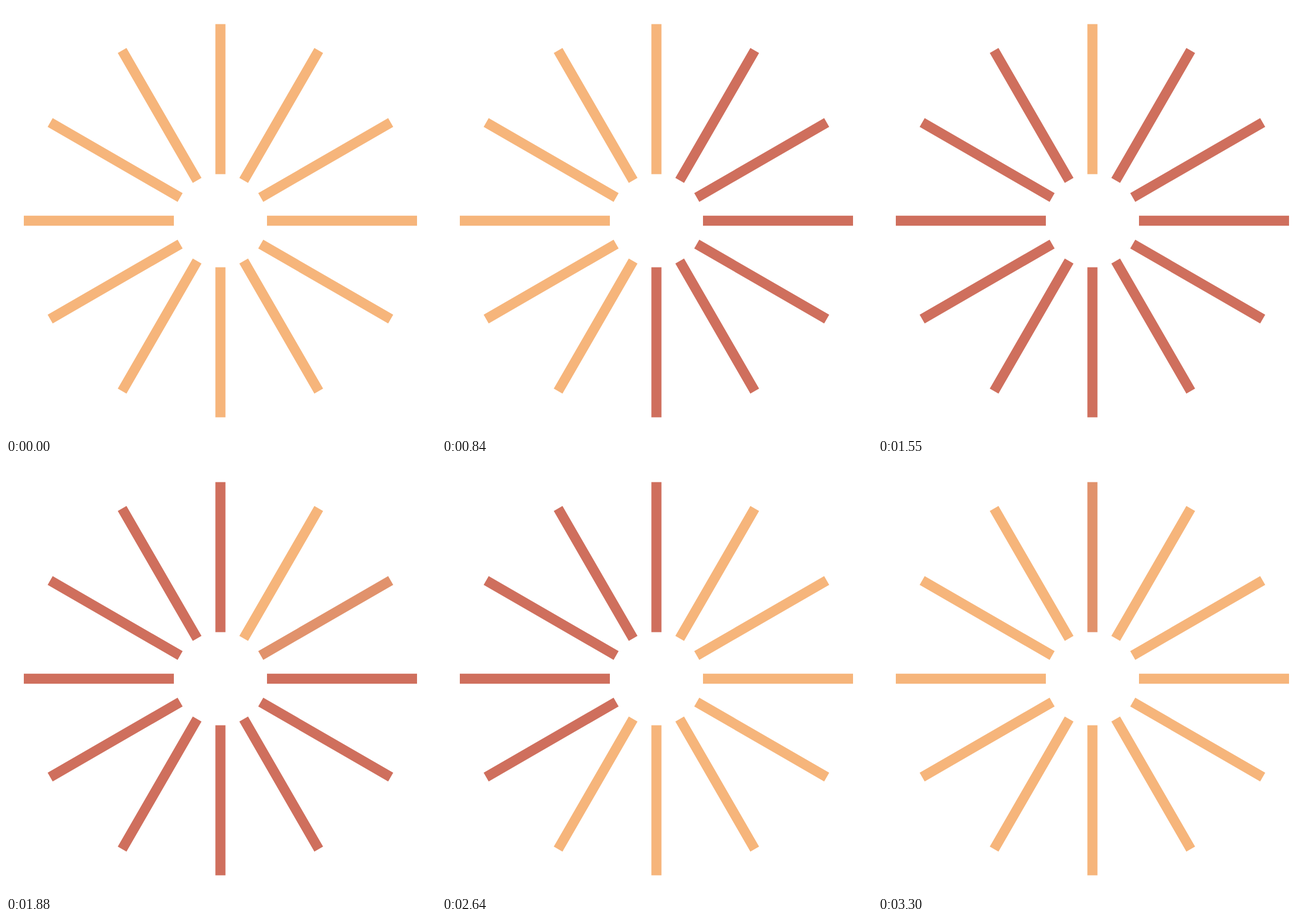
Write an HTML page that moves like this. It is 748 px wide and 748 px high and loops after 3330 ms.

```html
<!DOCTYPE html>
<html lang="en">
<head>
<meta charset="utf-8">
<title>Radial spinner</title>
<style>
  html, body { margin: 0; width: 100%; height: 100%; overflow: hidden; background: #fff; }
  svg { display: block; width: 100vw; height: 100vh; }
  line { stroke-width: 17.5; }
</style>
</head>
<body>
<svg viewBox="0 0 748 748"><g id="rays" transform="translate(373 373.6)"></g></svg>
<script>
  const COUNT = 12, LOOP = 3330, REST = 100;
  const ORANGE = '#f6b57b', BLEND = '#e1926c', RED = '#cf6f5d';

  const rays = Array.from({ length: COUNT }, (_, i) => {
    const ray = document.createElementNS('http://www.w3.org/2000/svg', 'line');
    ray.setAttribute('y1', -81);
    ray.setAttribute('y2', -342);
    ray.setAttribute('transform', `rotate(${i * 360 / COUNT})`);
    ray.setAttribute('stroke', ORANGE);
    document.getElementById('rays').append(ray);
    return ray;
  });

  // Two clockwise sweeps: to red, then back to orange.
  // The top ray turns red at once; the lower rays blend for longer.
  const changes = [];
  let clock = 0;
  for (let step = 1; step <= 2 * COUNT; step++) {
    const index = step % COUNT;
    const blend = step === COUNT ? 0 : index >= 4 && index <= 9 ? 50 : 30;
    const from = clock + REST;
    clock = from + blend;
    changes.push({ index, from, to: clock, color: step <= COUNT ? RED : ORANGE });
  }

  let start;
  function draw(now) {
    start ??= now;
    const t = (now - start) % LOOP;
    const colors = Array(COUNT).fill(ORANGE);
    for (const { index, from, to, color } of changes) {
      if (t >= from) colors[index] = t < to ? BLEND : color;
    }
    rays.forEach((ray, i) => ray.setAttribute('stroke', colors[i]));
    requestAnimationFrame(draw);
  }
  requestAnimationFrame(draw);
</script>
</body>
</html>
```
